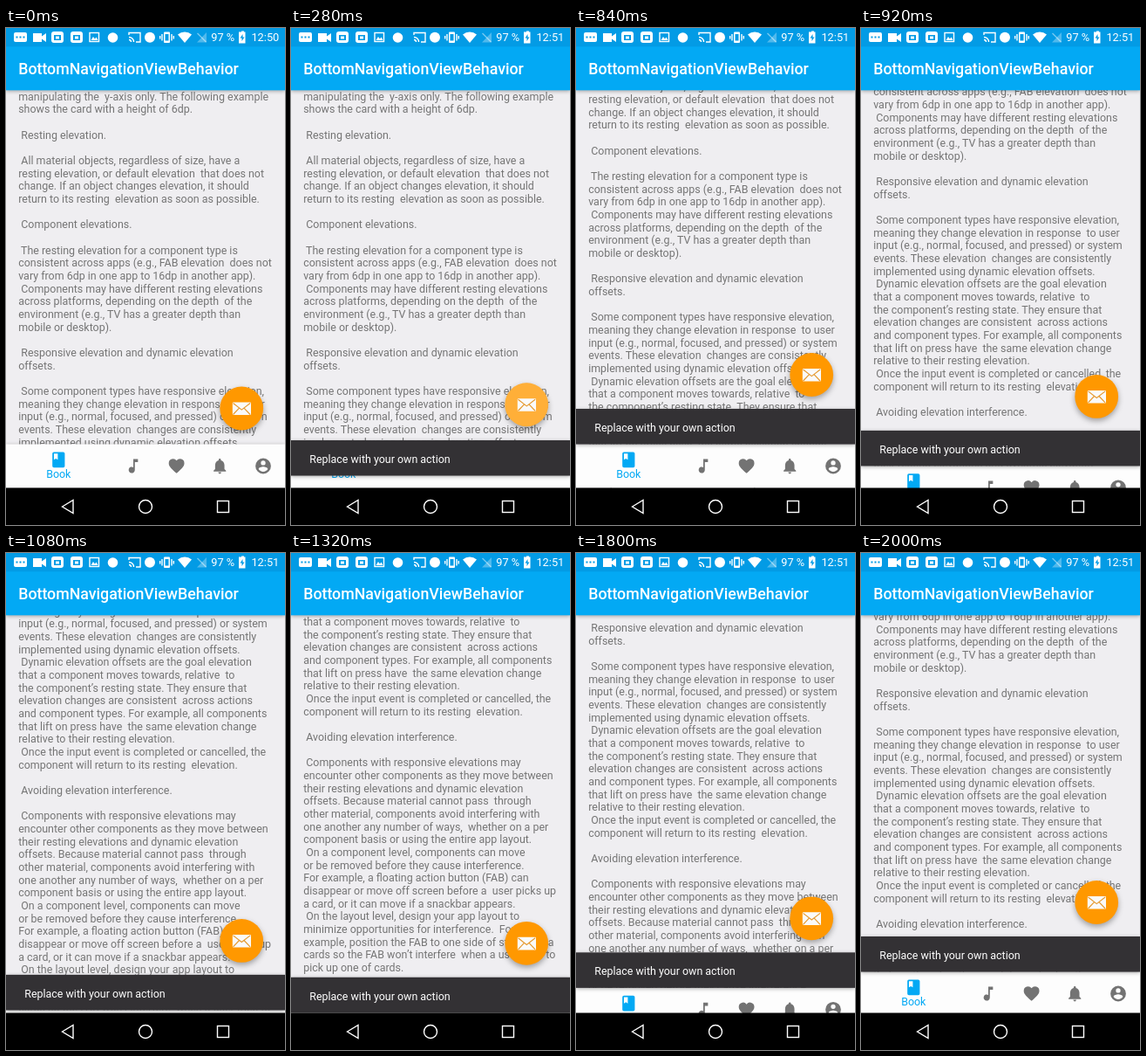
Animation, 320 px wide and 569 px high, one loop 2040 ms. Source, as an HTML page:

```html
<!DOCTYPE html>
<html lang="en">
<head>
<meta charset="utf-8">
<title>Bottom navigation behavior</title>
<style>
html, body { margin: 0; height: 100%; overflow: hidden; background: #efeef1; }
svg { display: block; width: 100vw; height: 100vh; font: 12.44px Roboto, sans-serif; }
text { white-space: pre; }
.title { font-size: 17.78px; font-weight: 500; }
.status { font-size: 12.8px; }
.line { fill: none; stroke: #fff; stroke-width: 1.4; }
.cut { fill: #039be5; }
.bar { filter: drop-shadow(0 1px 2px #0005); }
.fab { filter: drop-shadow(0 3px 3px #0005); }
</style>
</head>
<body>
<svg viewBox="0 0 320 569">
  <rect width="320" height="569" fill="#efeef1"/>
  <text id="article" fill="#757575"></text>

  <g id="bottom">
    <g class="bar">
      <rect y="476.5" width="320" height="50" fill="#fdfdfd"/>
      <g id="icons" fill="#737373"></g>
      <text x="60.3" y="515.3" text-anchor="middle" fill="#03a9f4">Book</text>
    </g>
    <g id="snack" class="bar">
      <rect y="436" width="320" height="40.5" fill="#333134"/>
      <text x="21.3" y="461.8" fill="#fff">Replace with your own action</text>
    </g>
    <g id="fab">
      <circle class="fab" cx="270.2" cy="397" r="24.9" fill="#ff9800"/>
      <circle id="ripple" cx="270.2" cy="397" fill="#fff"/>
      <rect x="259.8" y="390" width="21.2" height="14.6" rx="1" fill="#fafafa"/>
      <path d="M260.5 391l9.8 7.6 9.8-7.6M260.5 404l7-7.4M280 404l-7-7.4" fill="none" stroke="#e59a30" stroke-width="1.2"/>
    </g>
  </g>

  <g class="bar">
    <rect width="320" height="71.3" fill="#03a9f4"/>
    <rect width="320" height="21.3" fill="#039be5"/>
  </g>
  <text class="title" x="14.2" y="53" fill="#fff">BottomNavigationViewBehavior</text>

  <g fill="#fff">
    <path d="M11 5h11a2 2 0 0 1 2 2v7a2 2 0 0 1-2 2H11a2 2 0 0 1-2-2V7a2 2 0 0 1 2-2z"/>
    <path class="cut" d="M11.5 9.6h2v2h-2zm4 0h2v2h-2zm4 0h2v2h-2z"/>
    <path d="M31 6h10v3.4L46 6v10l-5-3.4V16H31z"/>
    <rect x="52" y="4" width="14" height="13" rx="3"/>
    <rect x="74" y="4" width="14" height="13" rx="3"/>
    <path class="cut" d="M55 8h8v6h-8zm22 0h8v6h-8z"/>
    <path d="M57 9.500h4v3h-4zm22 0h4v3h-4z"/>
    <rect class="line" x="96" y="5.500" width="10.500" height="10"/>
    <path d="M97.500 14l2.500-4 2 2.500 1.500-2 2 3.500z"/>
    <circle cx="122.500" cy="11" r="5.800"/>
    <path class="line" d="M141 8V5.500h13v10.500h-5M141 10.500a5.500 5.500 0 0 1 5.500 5.500M141 13.500a2.500 2.500 0 0 1 2.500 2.500"/>
    <circle cx="165" cy="10.700" r="6"/>
    <rect x="181" y="4.500" width="7" height="12.500" rx="1"/>
    <path class="cut" d="M182.500 7h4v7.500h-4z"/>
    <path class="line" d="M179 7v7.500M176.700 9v3.500M190 7v7.500M192.300 9v3.500"/>
    <path d="M197 7.500a12.500 12.500 0 0 1 16 0L205 17z"/>
    <path d="M230 5v11.500h-11z" opacity=".3"/>
    <path class="line" d="M219.500 6l10 10" opacity=".45"/>
    <text class="status" x="235.300" y="15.300">97 %</text>
    <path d="M269 4.500h1V3.500h3v1h1.500v13H267v-13z"/>
    <path class="cut" d="M271.500 7l-3 4.500h2V15l3-4.500h-2z"/>
    <text id="clock" class="status" x="313.300" y="15.300" text-anchor="end"></text>
  </g>

  <rect y="526.500" width="320" height="43"/>
  <g class="line">
    <path d="M64.500 548L77 540.500v15z"/>
    <circle cx="160" cy="548" r="7.500"/>
    <rect x="242.500" y="541.500" width="13" height="13"/>
  </g>
</svg>
<script>
const LOOP = 2040, STEP = 40;
const $ = id => document.getElementById(id);

const article = `manipulating the  y-axis only. The following example
shows the card with a height of 6dp.

 Resting elevation.

 All material objects, regardless of size, have a
resting elevation, or default elevation  that does not
change. If an object changes elevation, it should
return to its resting  elevation as soon as possible.

 Component elevations.

 The resting elevation for a component type is
consistent across apps (e.g., FAB elevation  does not
vary from 6dp in one app to 16dp in another app).
 Components may have different resting elevations
across platforms, depending on the depth  of the
environment (e.g., TV has a greater depth than
mobile or desktop).

 Responsive elevation and dynamic elevation
offsets.

 Some component types have responsive elevation,
meaning they change elevation in response  to user
input (e.g., normal, focused, and pressed) or system
events. These elevation  changes are consistently
implemented using dynamic elevation offsets.
 Dynamic elevation offsets are the goal elevation
that a component moves towards, relative  to
the component’s resting state. They ensure that
elevation changes are consistent  across actions
and component types. For example, all components
that lift on press have  the same elevation change
relative to their resting elevation.
 Once the input event is completed or cancelled, the
component will return to its resting  elevation.

 Avoiding elevation interference.

 Components with responsive elevations may
encounter other components as they move between
their resting elevations and dynamic elevation
offsets. Because material cannot pass  through
other material, components avoid interfering with
one another any number of ways,  whether on a per
component basis or using the entire app layout.
 On a component level, components can move
or be removed before they cause interference.
For example, a floating action button (FAB) can
disappear or move off screen before a  user picks up
a card, or it can move if a snackbar appears.
 On the layout level, design your app layout to
minimize opportunities for interference.  For
example, position the FAB to one side of stream of a
cards so the FAB won’t interfere  when a user tries to
pick up one of cards.`;

$('article').innerHTML = article.split('\n').map((line, i) =>
  `<tspan x="14.2" y="${82.7 + i * 14.667}">${line}</tspan>`).join('');

// Center x, center y and 24-unit outline of each tab icon
const icons = [
  [60.3, 494.3, 'M18 2H6Q4 2 4 4v16q0 2 2 2h12q2 0 2-2V4q0-2-2-2zM6 4h5v8l-2.5-1.5L6 12z'],
  [146, 501.5, 'M12 3v10.55A4 4 0 1 0 14 17V7h4V3z'],
  [195.6, 501.5, 'M12 21.35l-1.45-1.32C5.4 15.36 2 12.28 2 8.5A5.5 5.5 0 0 1 12 5.09 5.5 5.5 0 0 1 22 8.5c0 3.78-3.4 6.86-8.55 11.54z'],
  [245.2, 501.5, 'M10 20h4a2 2 0 0 1-4 0zM18 16v-5c0-3.07-1.64-5.64-4.5-6.32V4a1.5 1.5 0 0 0-3 0v.68C7.63 5.36 6 7.92 6 11v5l-2 2v1h16v-1z'],
  [295, 501.5, 'M12 2a10 10 0 0 0 0 20 10 10 0 0 0 0-20zm0 3a3 3 0 0 1 0 6 3 3 0 0 1 0-6zm0 14.2c-2.5 0-4.7-1.3-6-3.2 0-2 4-3.1 6-3.1s6 1.100 6 3.100c-1.300 1.900-3.500 3.200-6 3.200z']
];
$('icons').innerHTML = icons.map(([x, y, d], i) =>
  `<path d="${d}" fill-rule="evenodd" transform="translate(${x} ${y}) scale(.889) translate(-12 -12)"${i ? '' : ' fill="#03a9f4"'}/>`).join('');

const progress = (t, start, length) => Math.min(1, Math.max(0, (t - start) / length));

// cubic-bezier(x1, 0, .2, 1)
function ease(x, x1) {
  let lo = 0, hi = 1;
  for (let i = 0; i < 24; i++) {
    const u = (lo + hi) / 2, v = 1 - u;
    if (3 * v * v * u * x1 + .6 * v * u * u + u ** 3 < x) lo = u; else hi = u;
  }
  return lo * lo * (3 - 2 * lo);
}

// Time, scroll offset, velocity
const drag = [[740, 0, 0], [920, 196, 1.2], [1080, 364, .8], [1240, 425, 0],
  [1340, 425, 0], [1640, 385, -.4], [1800, 286, -.5], [2040, 198, -.33]];

function scrollAt(t) {
  if (t <= drag[0][0]) return 0;
  const i = drag.findIndex(key => key[0] > t);
  const [t0, y0, v0] = drag[i - 1], [t1, y1, v1] = drag[i];
  const h = t1 - t0, s = (t - t0) / h, r = 1 - s;
  return r * r * ((1 + 2 * s) * y0 + s * h * v0) + s * s * ((1 + 2 * r) * y1 - r * h * v1);
}

const shift = (id, y) => $(id).setAttribute('transform', `translate(0 ${y})`);

function draw(t) {
  const rise = ease(progress(t, 230, 270), .4);
  const hidden = ease(progress(t, 854, 330), 0) - ease(progress(t, 1687, 460), 0);
  shift('article', -scrollAt(t));
  shift('bottom', 49.8 * hidden);
  shift('snack', 40.5 * (1 - rise));
  shift('fab', 38.5 * (1 - rise));
  $('snack').style.visibility = rise > 0 ? 'visible' : 'hidden';
  $('ripple').setAttribute('r', 24.9 * progress(t, 10, 240));
  $('ripple').setAttribute('opacity', .22 * (1 - progress(t, 350, 250)));
  $('clock').textContent = t < STEP ? '12:50' : '12:51';
}

function tick() {
  draw(Math.floor(performance.now() % LOOP / STEP) * STEP);
  requestAnimationFrame(tick);
}
tick();
</script>
</body>
</html>
```
